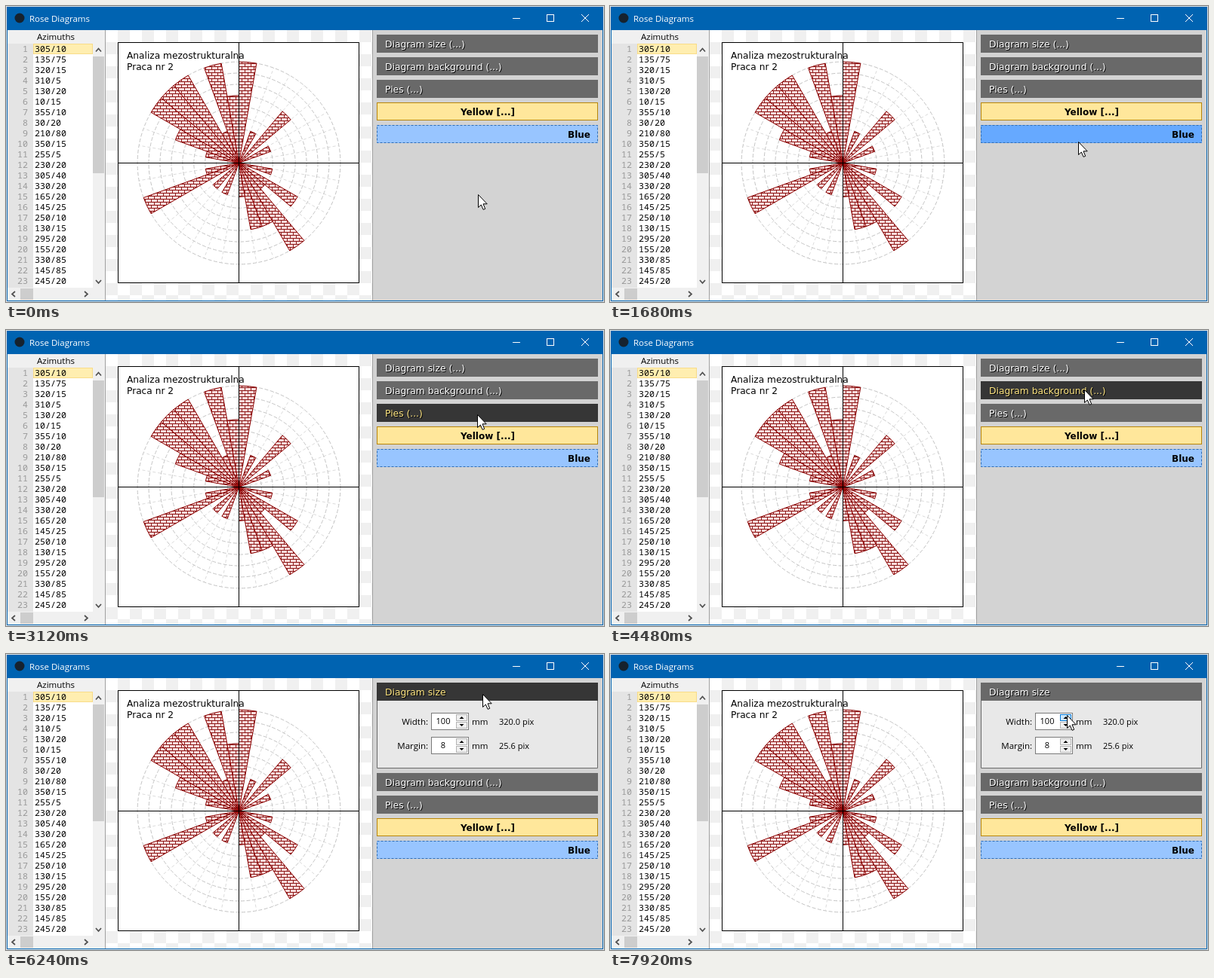
An HTML page with a canvas that plays this animation: 792 px wide and 393 px high, repeating every 8000 ms.

```html
<!DOCTYPE html>
<html lang="en">
<head>
<meta charset="utf-8">
<title>Rose Diagrams</title>
<style>
html, body { margin: 0; width: 100%; height: 100%; overflow: hidden; }
canvas { display: block; }
</style>
</head>
<body>
<canvas id="stage" width="792" height="393"></canvas>
<script>
const ctx = document.getElementById('stage').getContext('2d');
const LOOP = 8000;
const OPEN_TIME = 6240;
const UI = '11.5px "Open Sans", "Noto Sans", sans-serif';
const UI_SMALL = '11px "Open Sans", "Noto Sans", sans-serif';
const MONO = '11.67px "Noto Sans Mono", "DejaVu Sans Mono", monospace';
const LABEL = '12.3px "DejaVu Sans", sans-serif';
const BOLD = 'bold 12px "DejaVu Sans", sans-serif';

const azimuths = `305/10 135/75 320/15 310/5 130/20 10/15 355/10 30/20
  210/80 350/15 255/5 230/20 305/40 330/20 165/20 145/25 250/10 130/15
  295/20 155/20 330/85 145/85 245/20`.split(/\s+/);

// One digit per 10 degree sector, clockwise from north; 9 reaches the outer ring.
const sectors = '903060300030' + '393663003030' + '930000' + '363';
const counts = [
  [0, 9], [20, 3], [40, 6], [60, 3], [100, 3], [120, 6], [130, 3], [140, 9],
  [150, 6], [160, 6], [170, 3], [200, 3], [220, 3], [240, 9], [250, 3],
  [280, 3], [290, 6], [300, 9], [310, 9], [320, 9], [330, 3], [340, 9], [350, 6]
];

// Pointer moves: start, end, steps, target x, target y
const moves = [
  [120, 120, 1, 625, 245],
  [440, 1160, 11, 620, 183],
  [1680, 1760, 2, 620, 176],
  [1920, 2720, 13, 622, 137],
  [2800, 3120, 6, 624, 112],
  [3600, 3840, 5, 627, 91],
  [4000, 4120, 3, 628, 82],
  [4480, 5000, 9, 631, 53],
  [6920, 7560, 11, 609, 79],
  [7800, 7920, 3, 605, 81]
];

function pointerAt(time) {
  let x = 625, y = 250;
  for (const [start, end, steps, toX, toY] of moves) {
    if (time < start) break;
    const progress = end > start ? Math.min(1, (time - start) / (end - start)) : 1;
    const part = steps > 1 ? (Math.floor(progress * (steps - 1) + 1e-6) + 1) / steps : 1;
    x += (toX - x) * part;
    y += (toY - y) * part;
  }
  return { x: Math.round(x), y: Math.round(y) };
}

function box(x, y, w, h, color) {
  ctx.fillStyle = color;
  ctx.fillRect(x, y, w, h);
}

function frame(x, y, w, h, color, dash = []) {
  ctx.strokeStyle = color;
  ctx.lineWidth = 1;
  ctx.setLineDash(dash);
  ctx.strokeRect(x + 0.5, y + 0.5, w - 1, h - 1);
  ctx.setLineDash([]);
}

function text(str, x, y, font, color = '#000', align = 'left') {
  ctx.font = font;
  ctx.fillStyle = color;
  ctx.textAlign = align;
  ctx.fillText(str, x, y);
}

function line(points, color, width = 1) {
  ctx.beginPath();
  points.forEach(([x, y]) => ctx.lineTo(x, y));
  ctx.strokeStyle = color;
  ctx.lineWidth = width;
  ctx.stroke();
}

function chevron(x, y, dx, dy) {
  const a = 3.5, b = 2;
  line([[x - dx * b - dy * a, y - dy * b - dx * a], [x + dx * b, y + dy * b],
        [x - dx * b + dy * a, y - dy * b + dx * a]], '#505050', 1.7);
}

function brickPattern() {
  const tile = document.createElement('canvas');
  tile.width = tile.height = 8;
  const g = tile.getContext('2d');
  g.fillStyle = '#ffdcdc';
  g.fillRect(0, 0, 8, 8);
  g.fillStyle = '#8b1a1a';
  g.fillRect(0, 0, 8, 1);
  g.fillRect(0, 4, 8, 1);
  g.fillRect(0, 1, 1, 3);
  g.fillRect(4, 5, 1, 3);
  return ctx.createPattern(tile, 'repeat');
}
const bricks = brickPattern();

function drawWindow() {
  box(0, 0, 792, 393, '#e2e2e2');
  box(1, 1, 790, 391, '#0063b1');
  box(2, 32, 788, 359, '#f0f0f0');
  ctx.beginPath();
  ctx.arc(18, 16, 6.5, 0, Math.PI * 2);
  ctx.fillStyle = '#16222e';
  ctx.fill();
  text('Rose Diagrams', 31, 21, UI, '#fff');
  box(671, 16, 10, 1, '#fff');
  frame(716, 11, 10, 10, '#fff');
  line([[762, 11], [772, 21]], '#fff');
  line([[772, 11], [762, 21]], '#fff');
}

function drawList() {
  text('Azimuths', 66, 45, UI, '#000', 'center');
  box(2, 50, 34, 324, '#e4e4e4');
  box(36, 50, 79, 324, '#fff');
  box(36, 50, 79, 14, '#ffeeb0');
  frame(36, 50, 79, 14, '#f0c860', [1, 1]);
  azimuths.forEach((value, i) => {
    const y = 61 + i * 14;
    text(String(i + 1), 29, y, MONO, '#999', 'right');
    text(value, 38, y, MONO);
  });
  box(115, 67, 15, 155, '#cdcdcd');
  box(19, 375, 17, 15, '#cdcdcd');
  chevron(122.5, 58.5, 0, -1);
  chevron(122.5, 366, 0, 1);
  chevron(10, 382.5, -1, 0);
  chevron(106, 382.5, 1, 0);
  box(131, 32, 1, 359, '#a0a0a0');
}

function drawRose() {
  const cx = 308.5, cy = 208.5, radius = 134.4;
  const rad = degrees => (degrees - 90) * Math.PI / 180;
  box(132, 32, 353, 359, '#fff');
  ctx.save();
  ctx.beginPath();
  ctx.rect(132, 32, 353, 359);
  ctx.clip();
  for (let row = 0; row < 23; row++) {
    for (let col = 0; col < 23; col++) {
      if ((row + col) % 2) box(132 + col * 16, 32 + row * 16, 16, 16, '#f0f0f0');
    }
  }
  ctx.restore();
  box(148, 48, 320, 320, '#fff');

  ctx.lineWidth = 1;
  ctx.setLineDash([4, 3]);
  for (let a = 0; a < 360; a += 10) {
    line([[cx, cy], [cx + radius * Math.cos(rad(a)), cy + radius * Math.sin(rad(a))]], '#dcdcdc');
  }
  ctx.setLineDash([5, 2.5]);
  ctx.strokeStyle = '#c4c4c4';
  for (let i = 1; i <= 9; i++) {
    ctx.beginPath();
    ctx.arc(cx, cy, radius * i / 9, 0, Math.PI * 2);
    ctx.stroke();
  }
  ctx.setLineDash([]);

  ctx.strokeStyle = '#8b0000';
  for (const [angle, count] of counts) {
    ctx.beginPath();
    ctx.moveTo(cx, cy);
    ctx.arc(cx, cy, radius * count / 9, rad(angle), rad(angle + 10));
    ctx.closePath();
    ctx.fillStyle = bricks;
    ctx.fill();
    ctx.stroke();
  }
  box(148, 208, 320, 1, '#000');
  box(308, 48, 1, 320, '#000');
  frame(148, 48, 320, 320, '#000');
  text('Analiza mezostrukturalna', 160, 70, '12.2px "DejaVu Sans", sans-serif');
  text('Praca nr 2', 160, 85, '12.2px "DejaVu Sans", sans-serif');
}

function drawHeader(label, y, hovered) {
  box(491, y, 293, 24, hovered ? '#363636' : '#696969');
  text(label, 503, y + 18, LABEL, '#000');
  text(label, 502, y + 17, LABEL, hovered ? '#ffe680' : '#fff');
}

function drawSpin(label, value, pixels, y, hotUp) {
  text(label, 559, y + 16, UI, '#000', 'right');
  box(563, y, 50, 23, '#fff');
  frame(563, y, 50, 23, '#7a7a7a');
  text(value, 579, y + 15, UI_SMALL, '#000', 'center');
  [1, -1].forEach((dir, i) => {
    const top = y + 2 + i * 10;
    const hot = hotUp && i === 0;
    box(596, top, 15, 9, hot ? '#cfe8fc' : '#f0f0f0');
    frame(596, top, 15, 9, hot ? '#0078d7' : '#b4b4b4');
    ctx.beginPath();
    ctx.moveTo(600.5, top + 4.5 + dir * 1.5);
    ctx.lineTo(606.5, top + 4.5 + dir * 1.5);
    ctx.lineTo(603.5, top + 4.5 - dir * 1.5);
    ctx.fillStyle = '#000';
    ctx.fill();
  });
  text('mm', 617, y + 16, UI);
  text(pixels, 653, y + 16, UI_SMALL);
}

function drawPanel(open, pointer) {
  box(485, 32, 1, 359, '#a0a0a0');
  box(486, 32, 304, 359, '#d3d3d3');
  const shift = open ? 90 : 0;
  const over = y => pointer.y >= y && pointer.y < y + 24;

  drawHeader(open ? 'Diagram size' : 'Diagram size (...)', 38, over(38));
  if (open) {
    box(491, 62, 293, 90, '#e8e8e8');
    line([[491.5, 62], [491.5, 151.5], [783.5, 151.5], [783.5, 62]], '#696969');
    drawSpin('Width:', '100', '320.0 pix', 78, pointer.x < 612 && pointer.y > 76);
    drawSpin('Margin:', '8', '25.6 pix', 110, false);
  }
  drawHeader('Diagram background (...)', 68 + shift, over(68 + shift));
  drawHeader('Pies (...)', 98 + shift, over(98 + shift));

  const yellow = 128 + shift, blue = 158 + shift;
  box(491, yellow, 293, 24, over(yellow) ? '#ffd966' : '#ffe79b');
  frame(491, yellow, 293, 24, '#b8860b');
  text('Yellow [...]', 638, yellow + 17, BOLD, '#000', 'center');
  box(491, blue, 293, 24, over(blue) ? '#66a9ff' : '#98c5ff');
  frame(491, blue, 293, 24, '#2f6db5', [3, 2]);
  text('Blue', 774, blue + 17, BOLD, '#000', 'right');
}

function drawPointer({ x, y }) {
  const outline = [[0, 0], [0, 17], [3.8, 13.5], [6.6, 19.8], [9.2, 18.8],
                   [6.5, 12.3], [11.7, 12.3]];
  ctx.beginPath();
  outline.forEach(([dx, dy]) => ctx.lineTo(x + 0.5 + dx, y + 0.5 + dy));
  ctx.closePath();
  ctx.fillStyle = '#fff';
  ctx.fill();
  ctx.strokeStyle = '#000';
  ctx.lineWidth = 1;
  ctx.stroke();
}

function render(now) {
  const time = now % LOOP;
  const pointer = pointerAt(time);
  drawWindow();
  drawList();
  drawRose();
  drawPanel(time >= OPEN_TIME, pointer);
  drawPointer(pointer);
}

let origin;
function tick(now) {
  origin ??= now;
  render(now - origin);
  requestAnimationFrame(tick);
}
render(0);
requestAnimationFrame(tick);
</script>
</body>
</html>
```
